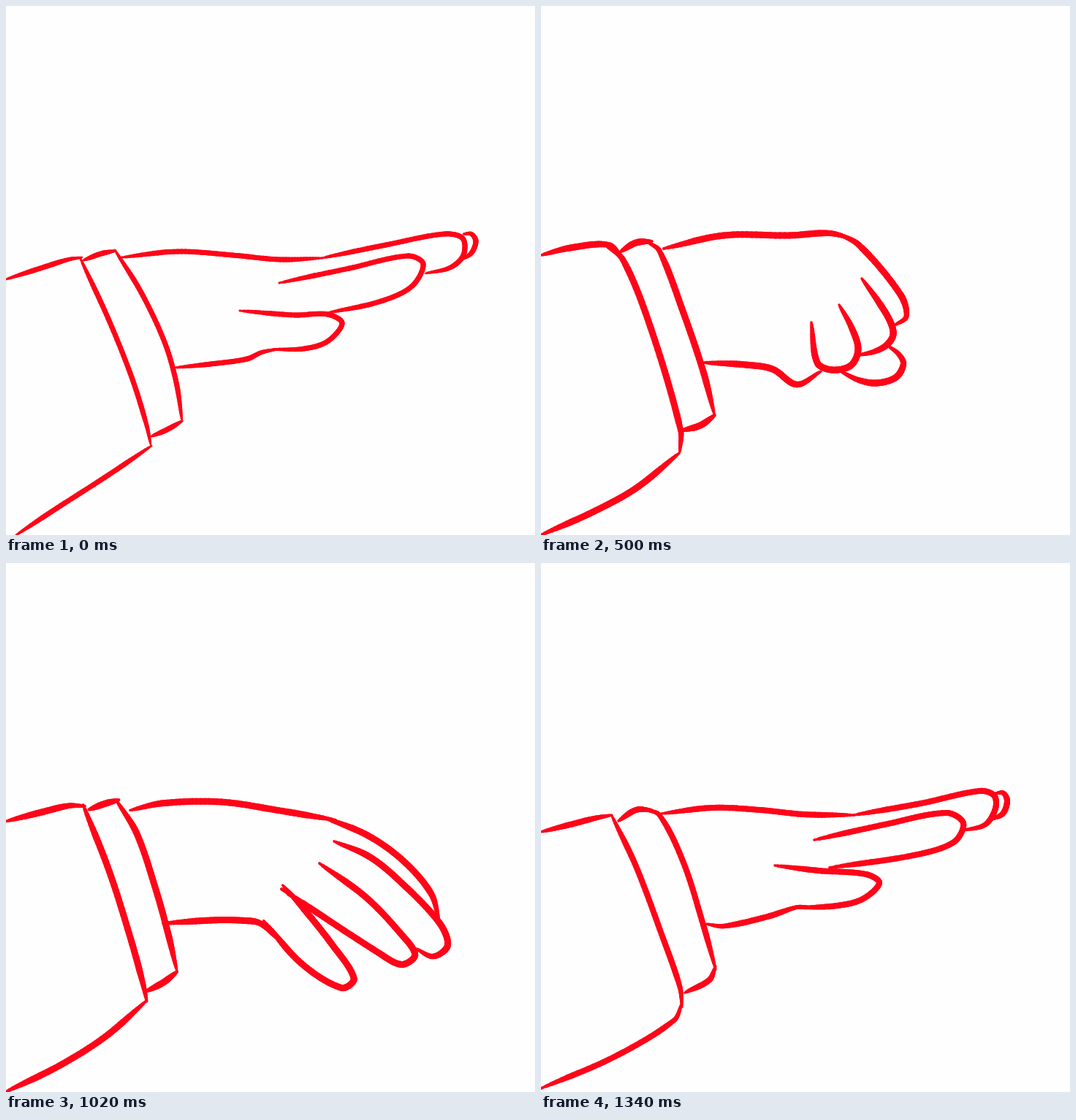
Write an HTML page with a canvas that moves like this. It is 724x724 px and loops after 1.36 s.

```html
<!DOCTYPE html>
<html lang="en">
<head>
<meta charset="utf-8">
<title>Closing hand</title>
<style>
html, body { margin: 0; width: 100%; height: 100%; overflow: hidden; background: #fefefe; }
canvas { display: block; width: 724px; height: 724px; }
</style>
</head>
<body>
<canvas id="stage" width="724" height="724"></canvas>
<script>
const ctx = document.getElementById('stage').getContext('2d');
const LOOP = 1360, STEP = 20, INK = '#ff0519';

// Each pose has the same strokes with the same number of points, so poses blend point by point.
const parse = (width, strokes) => {
  const pose = { width };
  for (const name in strokes)
    pose[name] = strokes[name].split(' ').map(p => p.split(',').map(Number));
  return pose;
};

const flat = parse(7, {
  sleeveTop: '0,374 50,358 85,347 104,344',
  sleeveEdge: '102,346 140,428 172,508 192,572 198,600',
  sleeveBottom: '199,602 140,642 70,687 14,724',
  cuffTop: '106,348 130,339 150,335',
  cuffEdge: '149,334 185,392 217,460 233,515 241,568',
  cuffBottom: '241,568 220,580 199,589',
  back: '158,344 235,336 310,341 375,347 432,345',
  outer: '626,312 637,312 643,322 637,338 624,347',
  middle: '432,345 520,327 600,312 625,318 626,341 608,358 574,366',
  near: '374,379 470,359 550,342 571,353 555,384 510,405 440,420',
  thumb: '320,417 395,423 440,422 460,434 440,459 408,469 365,470',
  palm: '375,469 350,474 330,483 280,490 231,495'
});

const droop = parse(9, {
  sleeveTop: '0,353 50,342 85,333 108,331',
  sleeveEdge: '108,331 145,430 172,518 187,575 192,598',
  sleeveBottom: '191,599 130,650 70,690 0,724',
  cuffTop: '114,338 135,331 155,324',
  cuffEdge: '152,327 180,375 205,450 222,510 234,558',
  cuffBottom: '235,560 215,574 193,587',
  back: '170,339 215,330 295,328 375,341 455,356',
  outer: '435,352 500,376 550,410 590,457 605,497',
  middle: '449,382 500,402 545,434 605,497 619,530 600,546 575,533',
  near: '431,411 500,457 550,508 577,540 558,554 525,538 378,448',
  thumb: '368,438 395,468 440,525 476,575 460,588 400,553 345,489',
  palm: '370,516 348,491 325,487 285,488 213,494'
});

const fist = parse(9, {
  sleeveTop: '0,341 40,331 93,327 112,345',
  sleeveEdge: '88,327 112,347 150,440 191,580 190,610',
  sleeveBottom: '189,612 130,660 70,693 0,724',
  cuffTop: '109,336 130,324 152,322',
  cuffEdge: '146,323 162,335 195,420 222,500 237,558',
  cuffBottom: '238,560 218,574 193,581',
  back: '168,332 250,314 340,314 395,311 427,319',
  outer: '405,311 435,327 492,395 500,425 484,437',
  middle: '439,373 462,405 478,432 482,450 473,464 456,473 434,478',
  near: '408,409 425,440 434,470 424,492 398,498 378,488 370,433',
  thumb: '475,465 490,477 496,490 486,508 460,516 435,512 410,500',
  palm: '383,500 350,518 317,497 280,491 222,488'
});

const fistHigh = parse(8.5, {
  sleeveTop: '0,335 50,322 90,315 110,317',
  sleeveEdge: '108,319 145,415 172,495 190,555 194,596',
  sleeveBottom: '191,597 125,650 60,690 0,723',
  cuffTop: '111,321 135,311 156,315',
  cuffEdge: '146,311 168,325 200,400 228,480 239,542',
  cuffBottom: '241,544 220,556 196,566',
  back: '170,322 260,304 300,301 360,301 418,298',
  outer: '416,297 440,322 470,370 486,408 476,428',
  middle: '437,363 455,390 466,420 467,440 456,458 440,466 418,468',
  near: '406,386 412,425 416,466 400,482 376,486 366,465 370,407',
  thumb: '466,448 484,470 491,488 483,508 460,515 430,506 403,484',
  palm: '366,487 340,499 310,488 280,477 231,476'
});

const fistLow = parse(8.5, {
  sleeveTop: '0,352 50,336 92,325 115,347',
  sleeveEdge: '85,327 115,350 155,470 188,575 199,612',
  sleeveBottom: '198,608 180,628 100,674 0,724',
  cuffTop: '110,334 135,319 155,322',
  cuffEdge: '146,317 162,330 200,420 228,492 236,556',
  cuffBottom: '236,550 224,566 180,578',
  back: '167,333 215,317 290,312 360,309 414,312',
  outer: '414,311 450,338 490,390 505,418 489,440',
  middle: '442,374 462,404 477,430 482,450 474,464 458,473 437,478',
  near: '405,407 423,447 434,480 418,497 393,502 379,490 368,431',
  thumb: '476,466 491,480 497,494 486,512 462,518 440,514 413,503',
  palm: '378,503 350,516 320,505 282,491 229,488'
});

const open = parse(9, {
  sleeveTop: '0,376 40,359 75,348 104,347',
  sleeveEdge: '104,347 140,415 170,500 190,570 199,618',
  sleeveBottom: '199,618 150,652 80,688 0,722',
  cuffTop: '113,355 138,344 160,340',
  cuffEdge: '152,340 168,350 205,440 232,515 243,576',
  cuffBottom: '244,577 225,592 202,599',
  back: '172,352 250,344 330,358 405,366 458,376',
  outer: '456,376 560,387 615,404 645,422 660,438',
  middle: '452,392 540,403 610,416 650,430 661,448 645,465 600,472',
  near: '416,411 500,427 585,443 602,465 580,483 500,473 400,461',
  thumb: '362,447 400,465 460,492 488,514 466,538 420,530 342,501',
  palm: '375,512 342,501 310,505 275,508 236,507'
});

const settled = parse(8, {
  sleeveTop: '0,368 40,358 75,349 97,345',
  sleeveEdge: '97,346 130,415 165,508 190,580 193,608',
  sleeveBottom: '193,602 182,626 100,676 0,719',
  cuffTop: '106,353 130,338 152,338',
  cuffEdge: '140,337 162,345 195,410 222,495 239,556',
  cuffBottom: '239,552 230,571 197,588',
  back: '165,343 235,335 300,338 360,344 428,345',
  outer: '622,315 633,315 638,326 632,343 616,351',
  middle: '428,345 520,329 600,312 620,318 622,336 608,358 578,366',
  near: '374,379 470,358 555,342 578,356 565,382 510,400 395,417',
  thumb: '320,414 380,421 445,426 463,438 440,460 405,469 350,472',
  palm: '365,470 350,471 310,484 250,497 226,494'
});

const linear = u => u;
const easeOut = u => 1 - (1 - u) ** 2;
const smooth = u => u * u * (3 - 2 * u);
const clamp = u => Math.max(0, Math.min(1, u));
const lerp = (a, b, u) => a + (b - a) * u;

// The easing of a key applies on the way towards it.
const keys = [
  { at: 0, pose: flat },
  { at: 120, pose: flat, ease: linear },
  { at: 220, pose: open, ease: linear },
  { at: 280, pose: droop, ease: linear },
  { at: 500, pose: fist, ease: easeOut },
  { at: 720, pose: fistHigh, ease: smooth },
  { at: 900, pose: fistLow, ease: smooth },
  { at: 1050, pose: droop, ease: smooth },
  { at: 1120, pose: open, ease: linear },
  { at: 1340, pose: settled, ease: easeOut },
  { at: LOOP, pose: flat, ease: linear }
];

const HAND = ['back', 'outer', 'middle', 'near', 'thumb', 'palm'];
const noise = seed => {
  const v = Math.sin(seed * 12.9898) * 43758.5453;
  return (v - Math.floor(v)) * 2 - 1;
};

// The hand swings up at the wrist before it comes down to grab.
const lift = t => smooth(t < 120 ? t / 120 : clamp((230 - t) / 110));

function bend([x, y], amount) {
  const angle = -0.87 * amount * smooth(clamp((x - 150) / 260));
  const c = Math.cos(angle), s = Math.sin(angle), dx = x - 195, dy = y - 415;
  return [195 + dx * c - dy * s, 415 + dx * s + dy * c];
}

// Smooth curve through the points, with tangents scaled to the chord lengths.
function curve(pts) {
  const out = [], n = 14;
  const dist = (a, b) => Math.hypot(b[0] - a[0], b[1] - a[1]);
  const tangent = i => {
    const a = pts[Math.max(0, i - 1)], p = pts[i], b = pts[Math.min(pts.length - 1, i + 1)];
    const len = dist(a, p) + dist(p, b) || 1;
    return [(b[0] - a[0]) / len, (b[1] - a[1]) / len];
  };
  for (let i = 0; i < pts.length - 1; i++) {
    const a = pts[i], b = pts[i + 1], ta = tangent(i), tb = tangent(i + 1), len = dist(a, b);
    for (let k = i ? 1 : 0; k <= n; k++) {
      const u = k / n, h = smooth(u);
      const ha = u * (1 - u) ** 2 * len, hb = u * u * (u - 1) * len;
      out.push([0, 1].map(d => lerp(a[d], b[d], h) + ta[d] * ha + tb[d] * hb));
    }
  }
  return out;
}

function brush(pts, width) {
  const line = curve(pts), at = [0];
  for (let i = 1; i < line.length; i++)
    at.push(at[i - 1] + Math.hypot(line[i][0] - line[i - 1][0], line[i][1] - line[i - 1][1]));
  const total = at[at.length - 1], taper = Math.min(45, total * 0.35) || 1;
  for (let i = 1; i < line.length; i++) {
    const mid = (at[i] + at[i - 1]) / 2;
    const edge = clamp(Math.min(mid, total - mid) / taper);
    ctx.lineWidth = width * lerp(0.25, 1, Math.sqrt(edge));
    ctx.beginPath();
    ctx.moveTo(...line[i - 1]);
    ctx.lineTo(...line[i]);
    ctx.stroke();
  }
}

function draw(t) {
  const i = keys.findIndex(k => k.at > t);
  const from = keys[i - 1], to = keys[i];
  const raw = (t - from.at) / (to.at - from.at), u = to.ease(raw);
  const wobble = 1.5 * Math.sin(Math.PI * raw), raise = lift(t);
  const bob = -9 * Math.sin(Math.PI * clamp((t - 560) / 160));
  let seed = t + 1;

  ctx.fillStyle = '#fefefe';
  ctx.fillRect(0, 0, 724, 724);
  ctx.strokeStyle = INK;
  ctx.lineCap = 'round';
  for (const name in from.pose) {
    if (name === 'width') continue;
    const pts = from.pose[name].map(([x, y], k) => {
      const [ex, ey] = to.pose[name][k];
      const p = [lerp(x, ex, u) + wobble * noise(seed++), lerp(y, ey, u) + wobble * noise(seed++) + bob];
      return HAND.includes(name) ? bend(p, raise) : p;
    });
    brush(pts, lerp(from.pose.width, to.pose.width, u));
  }
}

const start = performance.now();
function tick() {
  const t = (performance.now() - start) % LOOP;
  draw(Math.floor(t / STEP) * STEP);
  requestAnimationFrame(tick);
}
tick();
</script>
</body>
</html>
```
